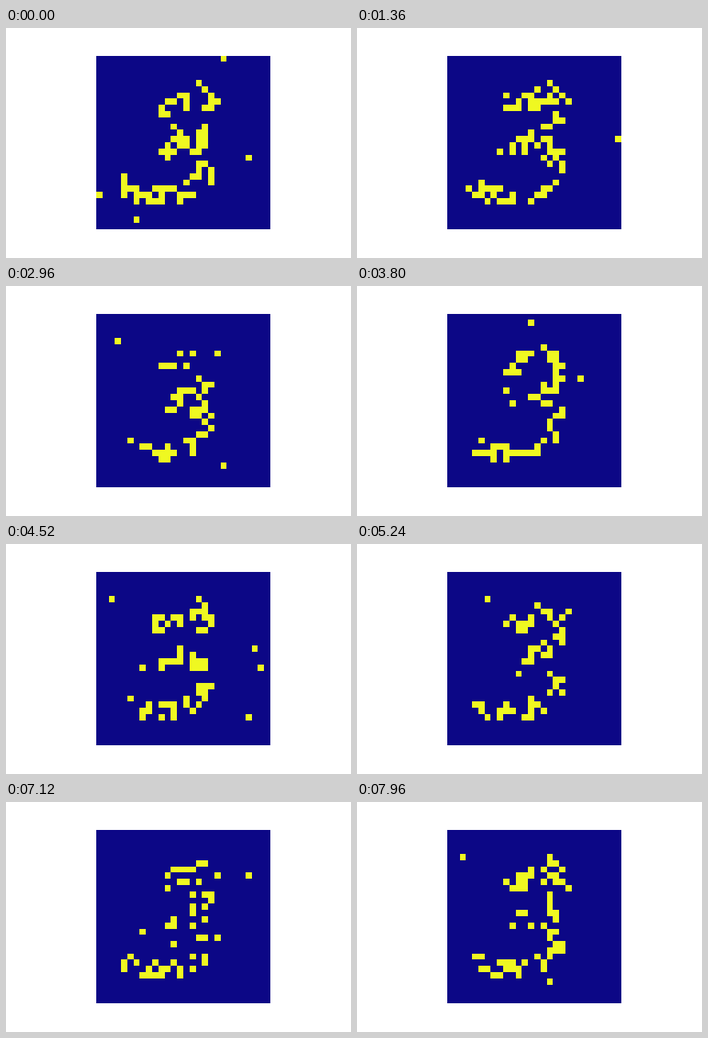
These frames come from a looping animation (432 by 288 pixels, 8 s). A matplotlib script:

```python
import numpy as np
import matplotlib.pyplot as plt
from matplotlib.animation import FuncAnimation

SIZE = 28
FRAMES = 200
RATE = 0.45     # firing probability on the pen line
NOISE = 0.0055  # firing probability everywhere else


def bezier(p0, p1, p2, p3):
    t = np.linspace(0, 1, 60)[:, None]
    p0, p1, p2, p3 = map(np.array, (p0, p1, p2, p3))
    return ((1 - t) ** 3 * p0 + 3 * t * (1 - t) ** 2 * p1
            + 3 * t ** 2 * (1 - t) * p2 + t ** 3 * p3)


def firing_rate():
    # The digit: top flag, upper hook, lower bowl, as (column, row) curves
    line = np.vstack([
        bezier((10.3, 8.2), (12.5, 7), (15, 6.5), (17, 5)),
        bezier((17, 5), (19.5, 10), (15.5, 12), (11.3, 14.5)),
        bezier((15, 13.5), (21.2, 18.5), (13, 24.7), (4.5, 20.9)),
    ])
    rows, cols = np.mgrid[:SIZE, :SIZE]
    cells = np.dstack([cols, rows])[:, :, None]
    dist = np.linalg.norm(cells - line, axis=-1).min(axis=-1)
    return np.maximum(RATE * np.clip((1.9 - dist) / 0.8, 0, 1), NOISE)


rng = np.random.default_rng(3)
spikes = rng.random((FRAMES, SIZE, SIZE)) < firing_rate()

fig, ax = plt.subplots(figsize=(6, 4), dpi=72, facecolor="white")
fig.subplots_adjust(left=0.125, right=0.9, bottom=0.125, top=0.88)
ax.axis("off")
image = ax.imshow(spikes[0].astype(float), cmap="plasma", vmin=0, vmax=1,
                  interpolation="nearest")


def update(i):
    image.set_data(spikes[i].astype(float))
    return [image]


anim = FuncAnimation(fig, update, frames=FRAMES, interval=40,
                     repeat=True, repeat_delay=0, blit=False)
plt.show()
```
